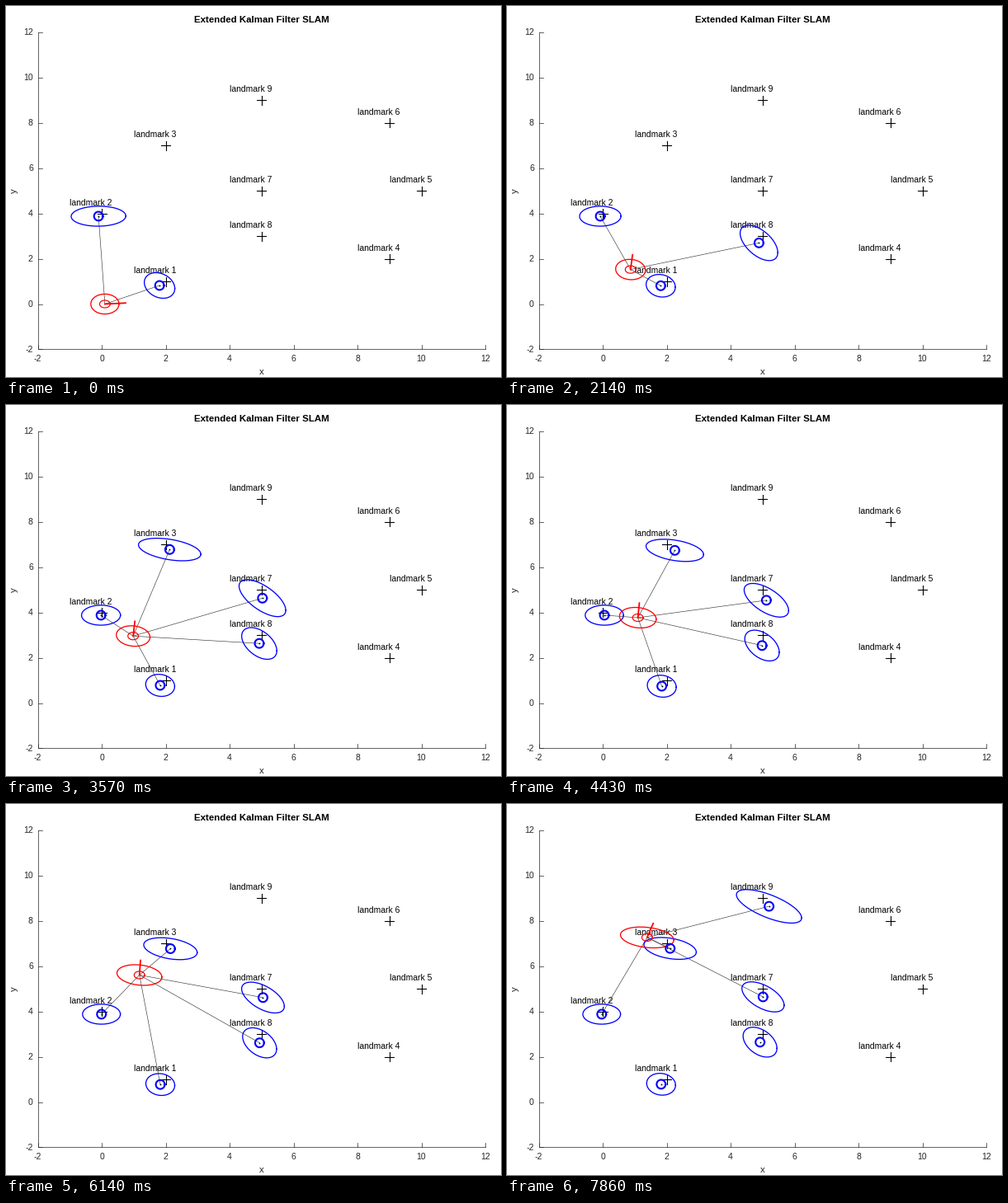
A matplotlib script that plays this animation: 600 px wide and 450 px high, repeating every 8 s.

```python
import matplotlib.pyplot as plt
import numpy as np
from matplotlib.animation import FuncAnimation

W, H, DPI = 600, 450, 100
PT = 72 / DPI                       # points per pixel
LOOP, TICK, STEPS = 8000, 50, 56    # the filter makes 56 steps per loop
X0, Y0, SX, SY = 116, 361.5, 38.75, 27.46     # pixel origin and scale of the plot
SENSOR_RANGE = 5
SPEED = 0.148                       # plot units per step
DARK = "#262626"

plt.rcParams["font.family"] = "Liberation Sans"

LANDMARKS = {1: (2, 1), 2: (0, 4), 3: (2, 7), 4: (9, 2), 5: (10, 5),
             6: (9, 8), 7: (5, 5), 8: (5, 3), 9: (5, 9)}

KEYS = [0, 10, 20, 31, 43, 51, 55]
PATH = np.array([(0.1, 0), (0.85, 0.77), (0.885, 2.28), (1.1, 3.77),
                 (1.18, 5.61), (1.21, 6.68), (1.39, 7.27)])
MAP_TURN = [0.03, 0.038, 0.034, 0.068, 0.053, 0.054, 0.047]


def to_px(x, y):
    return X0 + SX * x, Y0 - SY * y


def heading(n):
    return np.radians(np.interp(n, [0, 10, 43, 55], [4, 84, 87, 73]))


def direction(n):
    return np.array([np.cos(heading(n)), np.sin(heading(n))])


def robot(n):
    """Cubic path through the waypoints, leaving each along its heading."""
    i = min(np.searchsorted(KEYS, n, side="right") - 1, len(KEYS) - 2)
    d = KEYS[i + 1] - KEYS[i]
    t = (n - KEYS[i]) / d
    m0, m1 = (SPEED * d * direction(k) for k in KEYS[i:i + 2])
    return ((1 + 2 * t) * (1 - t) ** 2 * PATH[i] + t * (1 - t) ** 2 * m0
            + t * t * (3 - 2 * t) * PATH[i + 1] + t * t * (t - 1) * m1)


def estimate(k, n):
    """True position in a slightly turned and shifted map."""
    x, y = LANDMARKS[k]
    turn = np.interp(n, KEYS, MAP_TURN)
    return np.array([x + turn * y - 0.22, y - turn * x - 0.12])


def across(v):
    """Covariance of a unit heading error seen at offset v."""
    side = np.array([-v[1], v[0]])
    return np.outer(side, side)


def covariance(p):
    return 0.194 * np.eye(2) + 0.0095 * across(p)


def ellipse(p, cov):
    t = np.linspace(0, 2 * np.pi, 121)
    sx, sy = np.sqrt(np.diag(cov))
    tilt = np.arcsin(cov[0, 1] / (sx * sy))
    return to_px(p[0] + sx * np.cos(t), p[1] + sy * np.sin(t + tilt))


ROBOT = [robot(n) for n in range(STEPS)]
VISIBLE = {k: [np.hypot(*(p - LANDMARKS[k])) < SENSOR_RANGE for p in ROBOT]
           for k in LANDMARKS}
FIRST = {k: v.index(True) for k, v in VISIBLE.items() if any(v)}


def landmark_covariance(k, n):
    first_view = LANDMARKS[k] - ROBOT[FIRST[k]]
    fade = np.exp(-(n - FIRST[k]) / 9)
    return covariance(LANDMARKS[k]) + 0.024 * fade * across(first_view)


fig = plt.figure(figsize=(W / DPI, H / DPI), dpi=DPI, facecolor="white")
ax = fig.add_axes([0, 0, 1, 1])
ax.set_xlim(0, W)
ax.set_ylim(H, 0)
ax.axis("off")


def line(color, width, z, xs=(), ys=()):
    return ax.plot(xs, ys, color=color, lw=width * PT, zorder=z)[0]


def label(x, y, s, size=10.4, ha="center", color="black", **kw):
    ax.text(x, y, s, fontsize=size * PT, ha=ha, va="center", color=color, **kw)


def draw_axes():
    left, bottom = to_px(-2, -2)
    right, top = to_px(12, 12)
    line(DARK, 0.7, 1, [left, left, right], [top, bottom, bottom])
    for v in range(-2, 13, 2):
        x, y = to_px(v, v)
        line(DARK, 0.7, 1, [x, x], [bottom, bottom - 5])
        line(DARK, 0.7, 1, [left, left + 5], [y, y])
        label(x, 428, str(v), color=DARK)
        label(32.8, y + 0.5, str(v), ha="right", color=DARK)
    label(310, 444, "x", 11.5, color=DARK)
    label(10, 224, "y", 11.5, color=DARK, rotation=90)
    label(310, 16.5, "Extended Kalman Filter SLAM", 11.45, weight="bold")


def draw_landmarks():
    for k, (lx, ly) in LANDMARKS.items():
        x, y = to_px(lx, ly)
        line("black", 1.1, 2, [x - 5.5, x + 5.5], [y, y])
        line("black", 1.1, 2, [x, x], [y - 5.5, y + 5.5])
        tx, ty = to_px(lx - 1, ly + 0.5)
        label(tx, ty + 0.8, f"landmark {k}", ha="left")


draw_axes()
draw_landmarks()

rays = {k: line("#303030", 0.6, 4) for k in FIRST}
bounds = {k: line("blue", 1.3, 5) for k in FIRST}
rings = {k: line("blue", 2.1, 6) for k in FIRST}
dots = {k: ax.plot([], [], "o", color="black", ms=1.8 * PT, mew=0, zorder=7)[0]
        for k in FIRST}
robot_bound = line("red", 1.3, 5)
robot_body = line("red", 1.2, 6)
robot_nose = line("red", 1.8, 6)
RING = np.linspace(0, 2 * np.pi, 41)


def update(frame):
    n = int((frame + 0.9) * TICK * STEPS / LOOP)
    p = ROBOT[n]
    robot_bound.set_data(*ellipse(p, covariance(p)))
    robot_body.set_data(*ellipse(p, 0.165 ** 2 * np.eye(2)))
    robot_nose.set_data(*to_px(*np.transpose([p, p + 0.65 * direction(n)])))
    for k, first in FIRST.items():
        q = estimate(k, n)
        cx, cy = to_px(*q)
        rays[k].set_data(*to_px(*np.transpose([p, q])))
        rays[k].set_visible(VISIBLE[k][n])
        bounds[k].set_data(*ellipse(q, landmark_covariance(k, n)))
        rings[k].set_data(cx + 5.4 * np.cos(RING), cy + 5.4 * np.sin(RING))
        dots[k].set_data([cx], [cy])
        for part in (bounds[k], rings[k], dots[k]):
            part.set_visible(n >= first)
    return []


anim = FuncAnimation(fig, update, frames=LOOP // TICK, interval=TICK,
                     init_func=lambda: update(0), repeat=True, repeat_delay=0)
plt.show()
```
